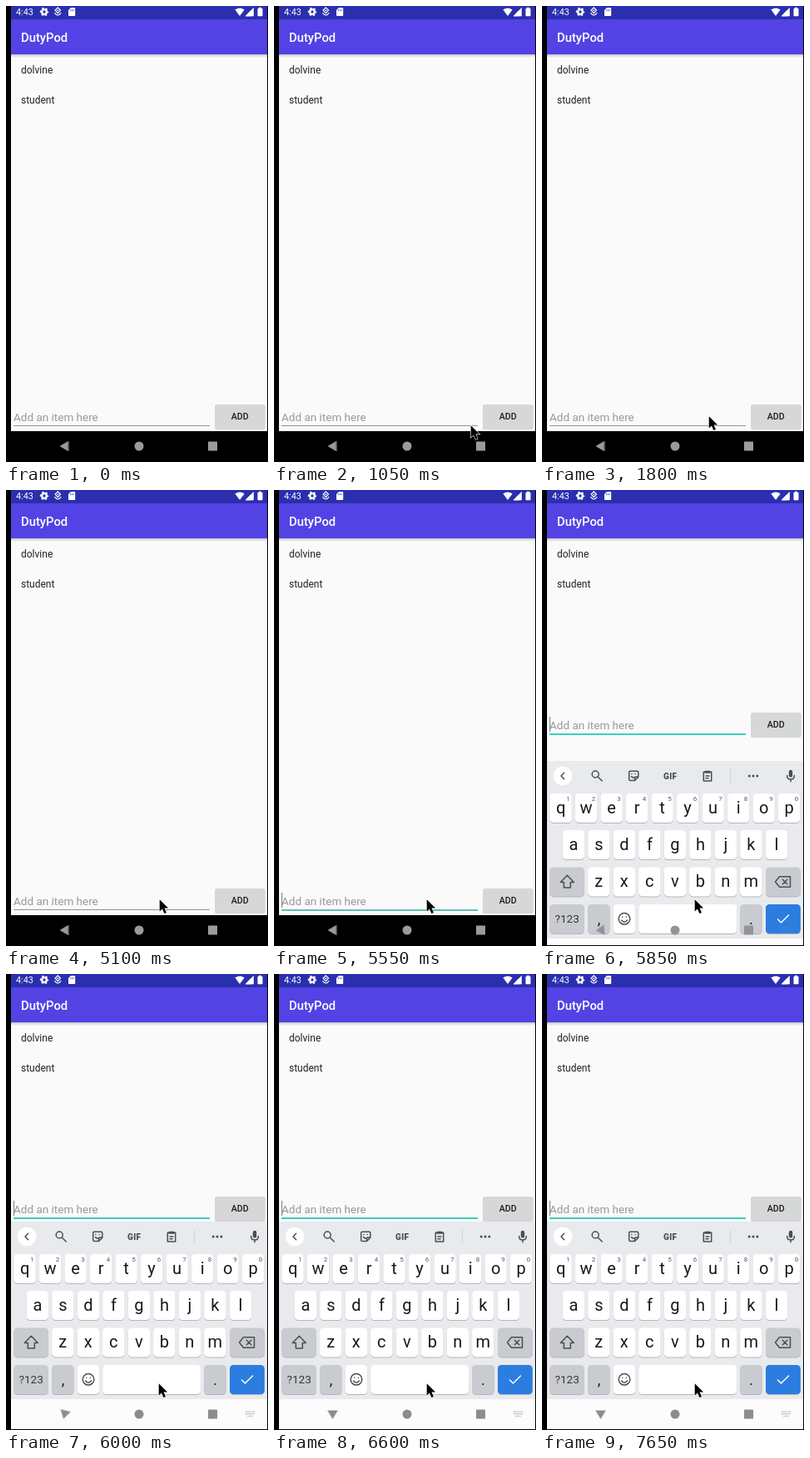
Recreate the animation shown at these times as an HTML page. Size 315 by 547 pixels, loop 8000 ms.

```html
<!DOCTYPE html>
<html lang="en">
<head>
<meta charset="utf-8">
<title>List app</title>
<style>
  html, body { margin: 0; width: 100%; height: 100%; overflow: hidden; background: #000; }
  svg { display: block; width: 100%; height: 100%; font-family: Roboto, Arial, sans-serif; }
  .medium { font-weight: 500; }
  .mid { text-anchor: middle; }
  .line { fill: none; stroke: #4b4e53; stroke-width: 1.5; stroke-linejoin: round; stroke-linecap: round; }

  .anim { animation: 8s step-end infinite; }
  #cursor { animation-name: cursor; }
  #entry { animation-name: entry; }
  #underline { animation-name: underline; }
  #caret { animation-name: caret; }
  #navbar { animation-name: navbar; }
  #keyboard { animation-name: keyboard; }
  #icons { animation-name: icons; }
  #back { animation-name: back; }
  #switcher { animation-name: switcher; }

  @keyframes cursor {
    0% { opacity: 0; transform: translate(236px, 503px); }
    13.125% { opacity: 1; transform: translate(236px, 503px); }
    16.875% { opacity: 1; transform: translate(192px, 491px); }
    18.75% { opacity: 1; transform: translate(198.6px, 491px); }
    20.625% { opacity: 1; transform: translate(199.5px, 491.4px); }
    22.5% { opacity: 1; transform: translate(200px, 492px); }
    63.75% { opacity: 1; transform: translate(184px, 491px); }
    65.625%, 100% { opacity: 1; transform: translate(183px, 491px); }
  }
  @keyframes entry {
    0% { transform: translateY(0); }
    73.125%, 100% { transform: translateY(-211px); }
  }
  @keyframes underline {
    0% { fill: #949494; height: 1px; }
    69.375% { fill: #62bdb1; height: 2px; }
    71.25%, 100% { fill: #3fcdbb; height: 2px; }
  }
  @keyframes caret {
    0%, 76.875%, 88.125% { opacity: 0; }
    69.375%, 82.5%, 95.625%, 100% { opacity: 1; }
  }
  @keyframes navbar {
    0% { fill: #000; }
    73.125%, 100% { fill: #fcfcfc; }
  }
  @keyframes keyboard {
    0% { opacity: 0; transform: translateY(28px); }
    73.125% { opacity: 1; transform: translateY(28px); }
    75%, 100% { opacity: 1; transform: translateY(0); }
  }
  @keyframes icons {
    0% { fill: #9b9b9b; }
    73.125% { fill: #929396; }
    75%, 100% { fill: #8c8c8c; }
  }
  @keyframes back {
    0% { transform: rotate(0deg); }
    73.125% { transform: rotate(-4deg); }
    75% { transform: rotate(-76deg); }
    76.875%, 100% { transform: rotate(-90deg); }
  }
  @keyframes switcher {
    0% { opacity: 0; }
    71.25% { opacity: .8; }
    73.125% { opacity: .4; }
    75%, 100% { opacity: .85; }
  }
</style>
</head>
<body>
<svg viewBox="0 0 315 547" preserveAspectRatio="none">
  <defs>
    <linearGradient id="shade" x2="0" y2="1">
      <stop stop-color="#c9c9cc"/>
      <stop offset="1" stop-color="#fafafa"/>
    </linearGradient>
    <clipPath id="screen"><rect x="6" width="308" height="546"/></clipPath>
  </defs>
  <rect width="315" height="547"/>

  <g clip-path="url(#screen)">
    <rect x="6" width="308" height="510" fill="#fafafa"/>
    <rect x="6" y="58" width="308" height="4" fill="url(#shade)"/>
    <rect x="6" y="16" width="308" height="42" fill="#5343e5"/>
    <rect x="6" width="308" height="16" fill="#2b2fae"/>

    <g fill="#fff">
      <text x="12" y="11" font-size="10.8">4:43</text>
      <circle cx="46" cy="7" r="2.8" fill="none" stroke="#fff" stroke-width="2.3"/>
      <circle cx="46" cy="7" r="4.5" fill="none" stroke="#fff" stroke-width="1.4" stroke-dasharray="2.5 2.21" stroke-dashoffset="1.2"/>
      <path d="M62.3 1.8l3.2 3.3-3.2 3.4-3.2-3.4zM58.4 8.2q3.9 5.6 7.8 0" fill="none" stroke="#fff" stroke-width="1.2"/>
      <circle cx="62.3" cy="5.2" r=".9"/>
      <path d="M78 2h4.2q1 0 1 1v8q0 1-1 1h-6.2q-1 0-1-1v-6z"/>
      <path d="M77.6 4.3v1.8M79.4 4.3v1.8M81.2 4.3v1.8" stroke="#2b2fae" stroke-width=".8"/>
      <path d="M281 12l-5.6-7.4q5.6-4.4 11.2 0z"/>
      <path d="M288 12l9.5-9.8v9.8z" opacity=".4"/>
      <path d="M288 12l6.6-6.8v6.8zM297.5 2.2v9.8h-9.5" stroke="#fff" stroke-width=".6"/>
      <path d="M304 2.8v-1.1h3v1.1h.8q.7 0 .7.7v8q0 .7-.7.7h-4.6q-.7 0-.7-.7v-8q0-.7.7-.7z"/>
      <text class="medium" x="18" y="43" font-size="14.8">DutyPod</text>
    </g>

    <g font-size="12" fill="#212121">
      <text x="18" y="80.5">dolvine</text>
      <text x="18" y="116.5">student</text>
    </g>

    <rect id="navbar" class="anim" x="6" y="510" width="308" height="36"/>

    <g id="entry" class="anim">
      <text x="9" y="498" font-size="13.5" fill="#999">Add an item here</text>
      <rect id="underline" class="anim" x="9" y="503" width="236" height="1"/>
      <rect id="caret" class="anim" x="9" y="483" width="1" height="18" fill="#6f8583"/>
      <rect x="251" y="479" width="60.5" height="29" rx="2" fill="#bdbdbd" opacity=".6"/>
      <rect x="251" y="478" width="60.5" height="29" rx="2" fill="#d6d7d7"/>
      <text class="medium mid" x="281.2" y="496.2" font-size="10.6" fill="#1c1c1c">ADD</text>
    </g>

    <g id="keyboard" class="anim">
      <rect x="6" y="297" width="308" height="213" fill="#e8eaed"/>
      <circle cx="25" cy="315" r="11.3" fill="#fff"/>
      <g class="line">
        <path d="M26.6 311.3l-3.6 3.7 3.6 3.7"/>
        <circle cx="64.2" cy="313" r="4"/>
        <path d="M67.2 316l5 5"/>
        <path d="M106 309.3h8.5q1.3 0 1.3 1.3v5.6l-4.2 4.3h-5.6q-1.3 0-1.3-1.3v-8.6q0-1.3 1.3-1.3zM115.8 316h-3q-1.2 0-1.2 1.2v3.3M107.5 315.5q2 2.6 4 1M107.8 312.5h.1M112 312.5h.1"/>
        <path d="M194.3 310.3h9.4v10.6h-9.4zM197 315h4M197 317.7h3"/>
        <path d="M196.6 310.2h4.8" stroke-width="3"/>
        <path d="M294.6 314.5q0 4.6 4.4 4.6t4.4-4.6M299 319.3v2.4"/>
      </g>
      <rect x="296.8" y="307.8" width="4.4" height="8.8" rx="2.2" fill="#4b4e53"/>
      <text class="mid" x="154.2" y="318.6" font-size="10" font-weight="900" letter-spacing=".4" fill="#4b4e53">GIF</text>
      <path d="M226.5 307v16" stroke="#cfd1d5"/>
      <g fill="#4b4e53"><circle cx="249.2" cy="315" r="1.5"/><circle cx="254" cy="315" r="1.5"/><circle cx="258.8" cy="315" r="1.5"/></g>
      <g id="keys"></g>
      <g class="line" stroke-width="1.6">
        <path d="M30.3 434.3l8 8.3h-4v6.4h-8v-6.4h-4z"/>
        <path d="M280.5 442l5-6.2h13v12.4h-13zM289.3 439.2l5.6 5.6M294.9 439.2l-5.6 5.6"/>
        <circle cx="99" cy="486.3" r="6.8"/>
        <path d="M95.6 488q3.4 4.4 6.8 0M96.7 484.2h.1M101.3 484.2h.1"/>
        <path d="M283.5 487l4 4 9-9" style="stroke:#fff"/>
      </g>
    </g>

    <g id="icons" class="anim">
      <g transform="translate(70.5 528)"><path id="back" class="anim" d="M-6 0l10.5-6.2v12.4z"/></g>
      <circle cx="160" cy="528" r="5.5"/>
      <rect x="243" y="522.5" width="11" height="11" rx=".6"/>
      <path id="switcher" class="anim" fill="none" stroke="#8f8f8f" stroke-width="1.3" stroke-dasharray="1.3 1.1" d="M288 525.2h11.3M288 527.6h11.3M290.4 530.4h6.4"/>
    </g>
  </g>

  <path id="cursor" class="anim" d="M.7.2v14.4l3.2-3 2.5 5.4 2.5-1.1-2.4-5.3h4.6z" stroke="#fff" stroke-width="1.1" paint-order="stroke"/>
</svg>
<script>
  const white = '#fff', grey = '#c9cbd0', blue = '#2c7de0';
  const step = 30.5;

  const key = (x, y, w, fill) =>
    `<rect x="${x}" y="${y + 1}" width="${w}" height="35" rx="4.5" fill="#b3b6bb"/>` +
    `<rect x="${x}" y="${y}" width="${w}" height="35" rx="4.5" fill="${fill}"/>`;
  const label = (x, y, size, text, fill = '#17181a') =>
    `<text class="mid" x="${x}" y="${y}" font-size="${size}" fill="${fill}">${text}</text>`;

  const row = (letters, first, y, digits = '') => [...letters].map((c, i) => {
    const x = first + i * step;
    return key(x - 13.2, y, 26.4, white) + label(x, y + 23.7, 20, c) +
      (digits ? label(x + 9, y + 8.8, 8, digits[i], '#55585d') : '');
  }).join('');

  document.getElementById('keys').innerHTML =
    row('qwertyuiop', 22.6, 336, '1234567890') +
    row('asdfghjkl', 37.9, 380) +
    row('zxcvbnm', 68.3, 424.4) +
    key(9.3, 424.4, 41.6, grey) + key(269, 424.4, 41.8, grey) +
    key(9.3, 469, 41.6, grey) + label(30.2, 491.2, 13.6, '?123', '#33363a') +
    key(55.2, 469, 26.4, grey) + label(68.4, 492.5, 18, ',') +
    key(85.8, 469, 26.4, white) + key(116.2, 469, 118, white) +
    key(238.2, 469, 26.6, grey) + label(251.4, 492.5, 18, '.') +
    key(269, 469, 41.8, blue);
</script>
</body>
</html>
```
